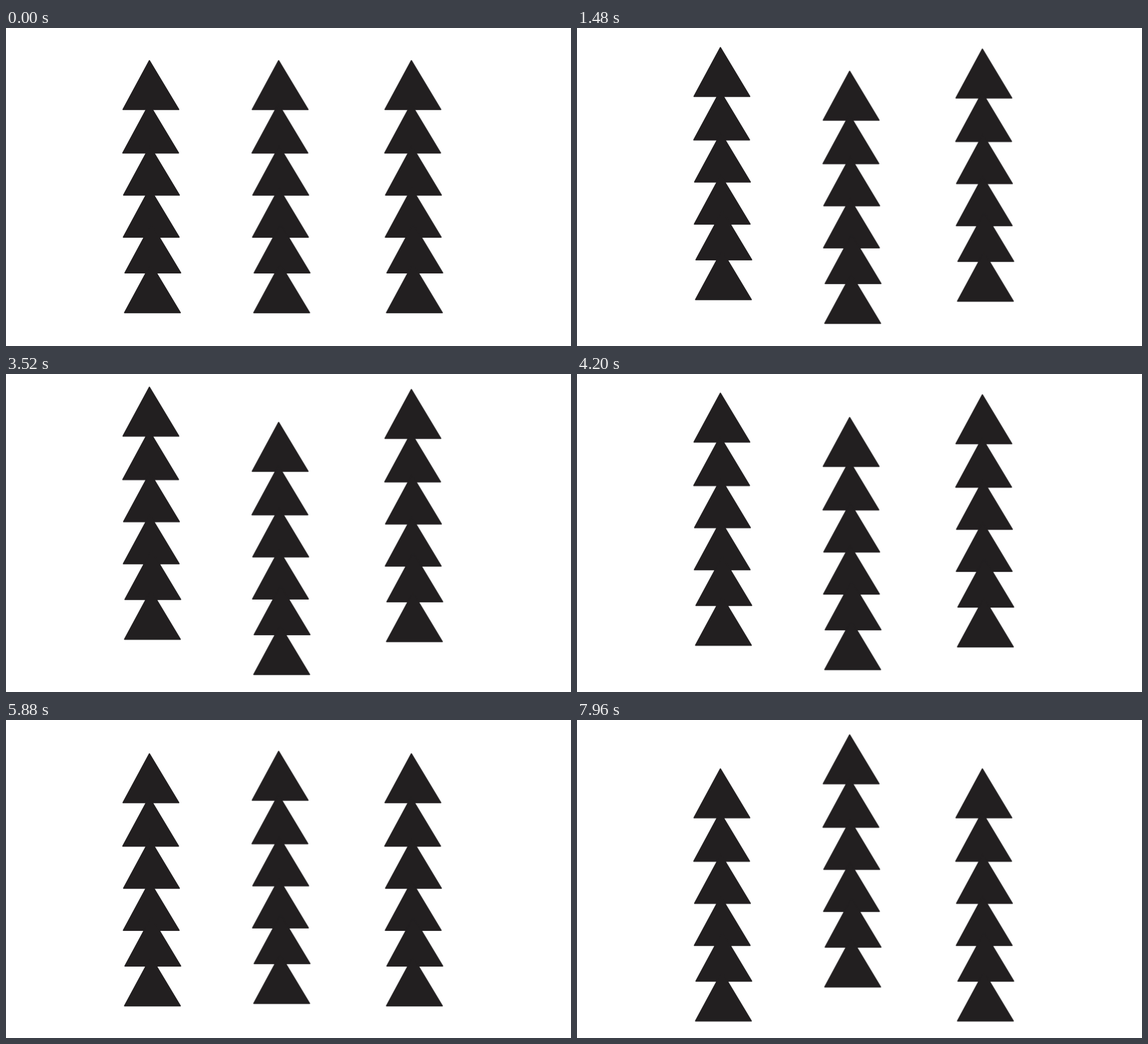
These frames come from a looping animation (998x561 px, 8000 ms). An HTML page:

```html
<!DOCTYPE html>
<html lang="en">
<head>
<meta charset="utf-8">
<title>Drifting trees</title>
<style>
  html, body { margin: 0; width: 100%; height: 100%; overflow: hidden; background: #fff; }
  svg { display: block; width: 100%; height: 100%; }
  path { fill: #221f20; stroke: #221f20; stroke-width: 2; stroke-linejoin: round; }
</style>
</head>
<body>
<svg viewBox="0 0 998 561"></svg>
<script>
const svg = document.querySelector('svg');
const LOOP = 8000;
const TURN = 2860;

// Offset of each triangle from the top one
const tiers = [[0, 0], [-0.4, 76.6], [1, 151], [0.6, 225.1], [3.4, 288.2], [2.7, 358.5]];

// Column x and vertical speed in px/ms: out, back, then the opposite way
const trees = [
  { x: 0, first: -0.0156, last: 0.0128 },
  { x: 228.3, first: 0.01267, last: -0.014 },
  { x: 462.7, first: -0.01373, last: 0.0128 }
];

function add(parent, tag, attrs = {}) {
  const node = document.createElementNS('http://www.w3.org/2000/svg', tag);
  for (const name in attrs) node.setAttribute(name, attrs[name]);
  return parent.appendChild(node);
}

const shift = y => `translate(0px, ${y}px)`;

for (const { x, first, last } of trees) {
  const column = add(svg, 'g', { transform: `translate(${x} 0)` });
  const tree = add(column, 'g');
  for (const [dx, dy] of tiers) {
    add(tree, 'path', {
      d: 'M253.3 57.6L305.2 143.8H206.7Z',
      transform: `translate(${dx} ${dy})`
    });
  }
  tree.animate([
    { offset: 0, transform: shift(0) },
    { offset: TURN / LOOP, transform: shift(first * TURN) },
    { offset: 2 * TURN / LOOP, transform: shift(0) },
    { offset: 1, transform: shift(last * (LOOP - 2 * TURN)) }
  ], { duration: LOOP, iterations: Infinity });
}
</script>
</body>
</html>
```
